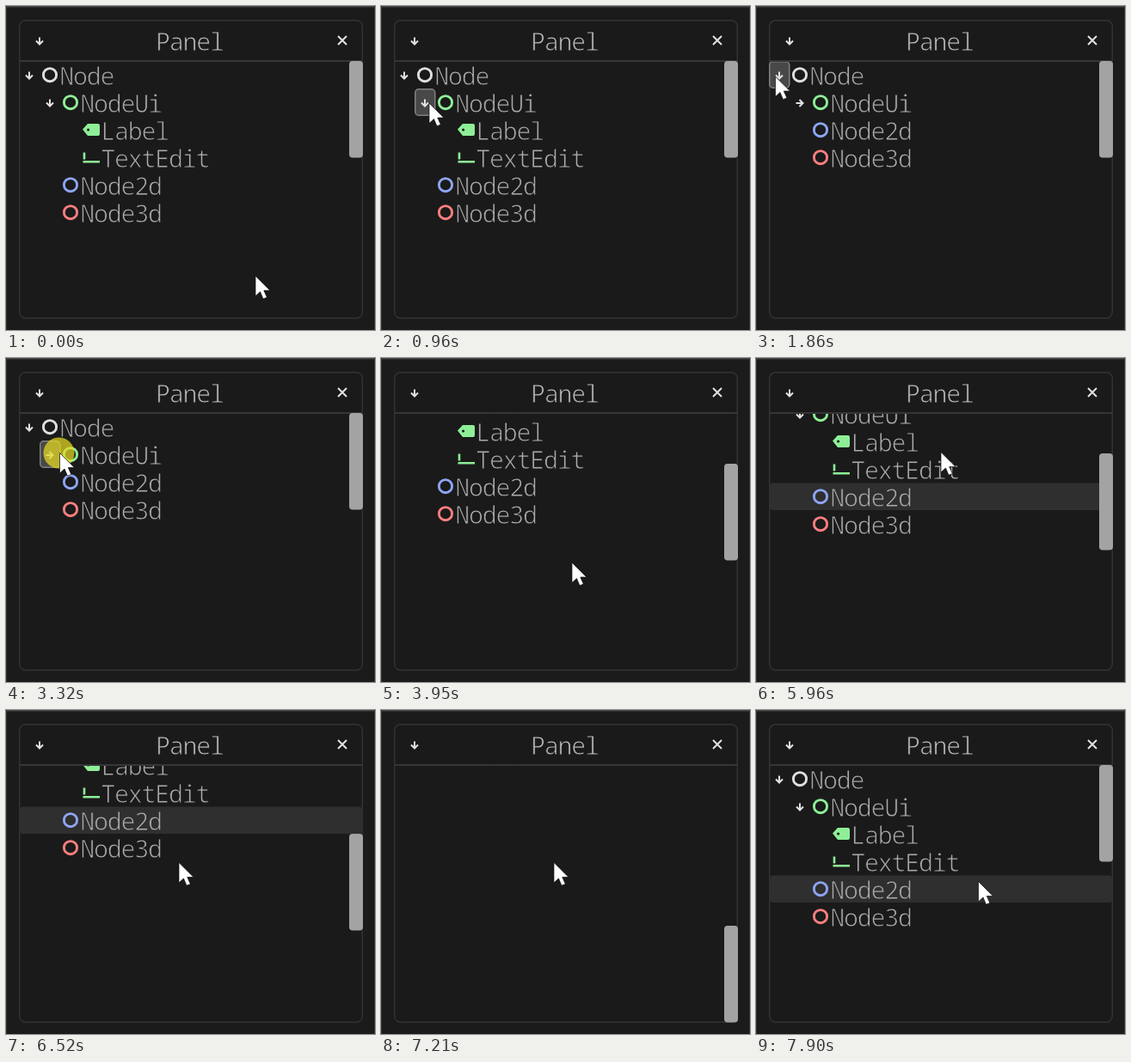
An HTML page that plays this animation: 429x377 px, repeating every 8560 ms.

```html
<!DOCTYPE html>
<html lang="en">
<head>
<meta charset="utf-8">
<title>Tree panel</title>
<style>
  html, body { margin: 0; width: 100%; height: 100%; overflow: hidden; background: #1b1b1b; }
  svg { display: block; width: 429px; height: 377px; }
  /* A background-coloured outline thins the letter strokes. */
  text {
    font: 200 28.4px "Noto Sans Mono", "DejaVu Sans Mono", monospace; letter-spacing: -1.3px;
    fill: #aaa; stroke: #1a1a1a; stroke-width: .9px;
  }
  .title { fill: #bbb; }
  .line { fill: none; stroke: #e2e2e2; stroke-width: 2; }
  .ring { fill: none; stroke-width: 2.9; }
  .hover { fill: #484848; stroke: #808080; stroke-width: 1.5; visibility: hidden; }
  .band { fill: none; }
  .selected .band { fill: #2f2f2f; }
  .selected text { stroke: #2f2f2f; }
  .over .hover { visibility: visible; }
  .closed .fold { transform: rotate(-90deg); }
</style>
</head>
<body>
<svg viewBox="0 0 429 377">
  <defs>
    <clipPath id="view"><rect x="15" y="64" width="400" height="299"/></clipPath>
    <path id="arrow" class="line" d="M0-4.5V3.5M-4-.5L0 3.5L4-.5"/>
  </defs>
  <rect width="429" height="377" fill="#1b1b1b"/>
  <path d="M0 .75H429" stroke="#484848" stroke-width="1.5"/>
  <path d="M.5 0V377M428.5 0V377" stroke="#343434"/>
  <rect x="15.75" y="16.75" width="398.5" height="346.5" rx="7" fill="#1a1a1a" stroke="#323232" stroke-width="1.5"/>
  <g id="tree" clip-path="url(#view)"></g>
  <path d="M16 64H414" stroke="#363636" stroke-width="2"/>
  <rect id="thumb" x="399" y="64" width="16" height="112.5" rx="4" fill="#a3a3a3"/>
  <use href="#arrow" x="39" y="41"/>
  <text class="title" x="174" y="52">Panel</text>
  <path class="line" d="M386 35L396 45M396 35L386 45"/>
  <circle id="press" r="18" fill="#e6dc22" fill-opacity=".72"/>
  <path id="cursor" d="M0 0V23.5L5.5 18.5L9 26.8L13.4 25L9.8 17H17Z" fill="#fff" stroke="#0c0c0c" stroke-width=".7"/>
</svg>
<script>
const LOOP = 8560, STEP = 70, HOLD = 140, ROW = 32, TOP = 64;
const $ = id => document.getElementById(id);
const green = "#8eef97";

const rows = [
  { name: "Node", depth: 0, color: "#e0e0e0", folder: true },
  { name: "NodeUi", depth: 1, color: green, folder: true },
  { name: "Label", depth: 2, icon: `<path fill="${green}" fill-rule="evenodd" d="M89 15.5L95 9H107Q109 9 109 11V21Q109 23 107 23H95ZM94 16a1.6 1.6 0 1 0 3.2 0a1.6 1.6 0 1 0-3.2 0"/>` },
  { name: "TextEdit", depth: 2, icon: `<path fill="none" stroke="${green}" stroke-width="2.6" d="M91 10.5V18.5M89.5 21.3H109"/>` },
  { name: "Node2d", depth: 1, color: "#8da5f3" },
  { name: "Node3d", depth: 1, color: "#fc7f7f" }
];

$("tree").innerHTML = rows.map(({ name, depth, color, icon, folder }) => {
  const x = depth * 24;
  const mark = icon || `<circle class="ring" cx="${x + 51}" cy="16.2" r="7.6" stroke="${color}"/>`;
  const fold = folder ? `<rect class="hover" x="${x + 15.75}" y=".75" width="23" height="30.5" rx="4"/>
    <g transform="translate(${x + 27} 17)"><use class="fold" href="#arrow"/></g>` : "";
  return `<g><rect class="band" x="16" y=".5" width="398" height="31.5" rx="4"/>
    ${fold}${mark}<text x="${x + 62.3}" y="28">${name}</text></g>`;
}).join("");
rows.forEach((row, i) => row.el = $("tree").children[i]);

// Drawing restarts its steady beat after each short rest.
const beats = [0, 260, 1790, 2690, 4290, 4840, 7480];

const glides = [
  { at: 260, take: 700, to: [56, 113] },
  { at: 1170, take: 350, to: [22.5, 82] },
  { at: 2900, take: 280, to: [62.5, 110.5] },
  { at: 3530, take: 420, to: [222, 238] },
  { at: 4290, take: 420, to: [219, 209.5] },
  { at: 5680, take: 280, to: [215, 109.5] },
  { at: 5960, take: 560, to: [201, 177.5] },
  { at: 7480, take: 420, to: [258.5, 199.5] }
];
const scrolls = [
  { at: 3740, take: 350, to: [91] },
  { at: 4290, take: 350, to: [187] },
  { at: 4980, take: 420, to: [0] },
  { at: 5680, take: 280, to: [47] },
  { at: 5960, take: 560, to: [80] },
  { at: 6520, take: 560, to: [187] },
  { at: 7480, take: 300, to: [0] }
];
const clicks = [
  { at: 1030, on: "NodeUi" }, { at: 1990, on: "Node" }, { at: 2690, on: "Node" },
  { at: 3250, on: "NodeUi" }, { at: 5540, on: "Node2d" }
];

const ease = u => u * u * (3 - 2 * u);
const clamp = u => Math.max(0, Math.min(1, u));
const place = (el, x, y) => el.setAttribute("transform", `translate(${x} ${y})`);

const follow = (start, moves, t) => moves.reduce((from, { at, take, to }) => {
  const e = ease(clamp((t - at) / take));
  return from.map((v, i) => v + (to[i] - v) * e);
}, start);

const clicked = (name, t) => clicks.filter(c => c.on === name && t >= c.at + HOLD).length % 2 === 1;

function tick(t) {
  const start = beats.findLast(beat => beat <= t);
  return start + STEP * Math.floor((t - start) / STEP);
}

function draw(t) {
  const [x, y] = follow([290, 314], glides, t);
  const offset = Math.round(follow([0], scrolls, t)[0]);
  let top = TOP - offset, closedDepth = Infinity;

  for (const { name, depth, folder, el } of rows) {
    if (depth <= closedDepth) closedDepth = Infinity;
    const hidden = depth > closedDepth;
    el.style.display = hidden ? "none" : "";
    if (hidden) continue;

    const on = clicked(name, t);
    const dx = x - 15 - depth * 24, dy = y - top;
    if (folder && on) closedDepth = depth;
    el.classList.toggle("closed", folder && on);
    el.classList.toggle("selected", !folder && on);
    el.classList.toggle("over", dx >= 0 && dx < 24 && dy >= 0 && dy < ROW);
    place(el, 0, top);
    top += ROW;
  }

  const pressed = clicks.some(({ at }) => t >= at && t < at + HOLD);
  $("press").style.display = pressed ? "" : "none";
  place($("press"), x - 1, y);
  place($("thumb"), 0, offset);
  place($("cursor"), x, y);
}

const begin = performance.now();
function frame() {
  draw(tick((performance.now() - begin) % LOOP));
  requestAnimationFrame(frame);
}
frame();
</script>
</body>
</html>
```
